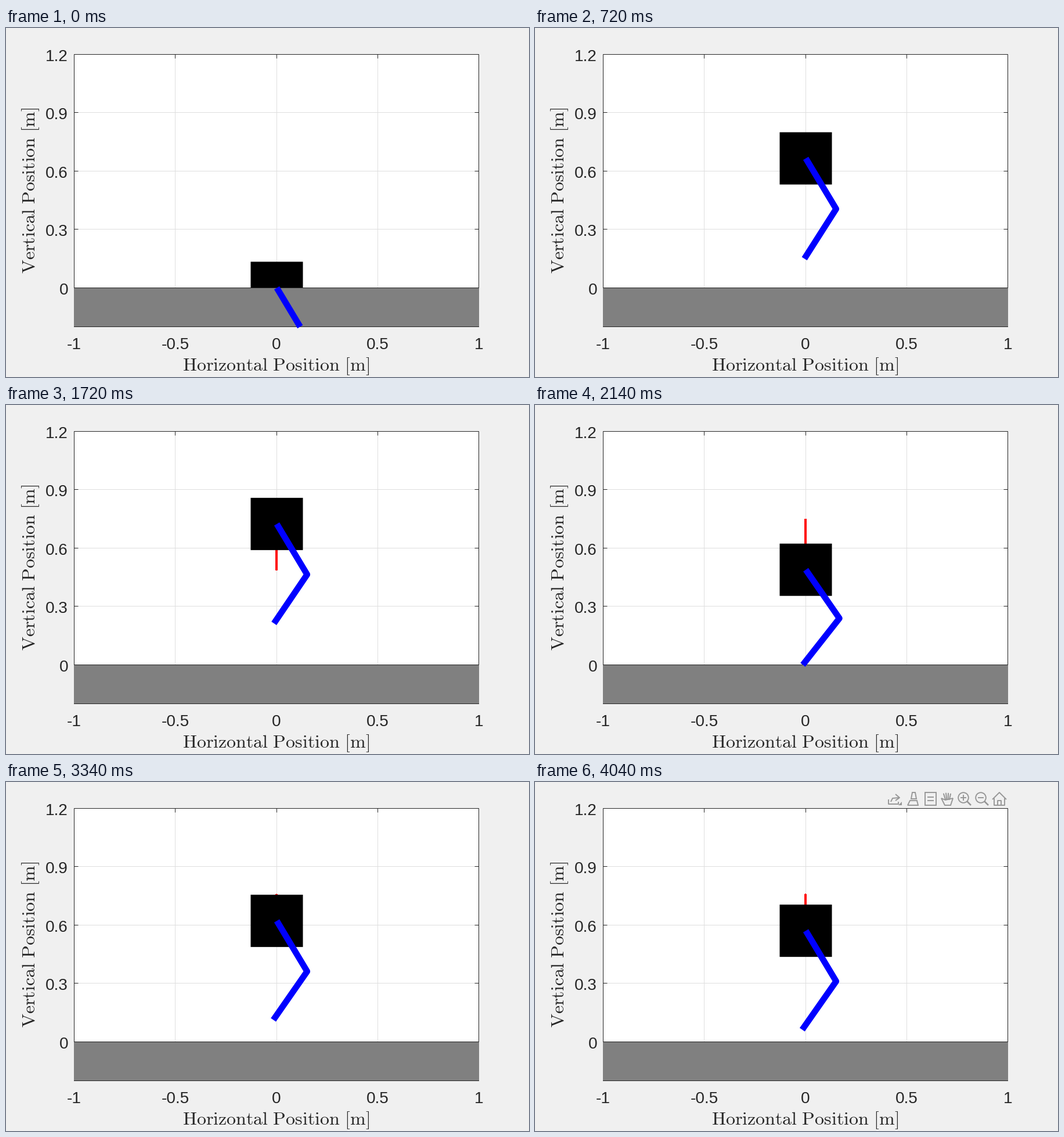
Write a matplotlib script that moves like this. It is 901x601 px and loops after 4060 ms.

```python
import math

import matplotlib.pyplot as plt
from matplotlib.animation import FuncAnimation
from matplotlib.patches import Circle, Polygon, Rectangle

W, H, DPI = 901, 601, 72          # at 72 dpi one point is one pixel
FRAMES, STEP = 203, 20
INK, ICON = "#262626", "#969696"

plt.rcParams.update({
    "font.family": "Liberation Sans",
    "mathtext.fontset": "cm",
    "path.simplify": False,
    "path.snap": False,
})

# Hopper: ballistic arcs joined by short stances, settling over the hops
LINK = 0.3
GRAVITY = 5.518
DROP = 0.672
DIP = 0.0215
TRAIL = 16


class Hop:
    """One arc through the air, with its leg pose and apex."""

    def __init__(self, i, lift):
        shank = math.radians(30 + 4.3 * (1 - math.exp(-i / 2.3)))
        self.foot = LINK * (0.5 - math.sin(shank))
        self.reach = LINK * (math.cos(math.pi / 6) + math.cos(shank))
        self.top = 0.756 - 0.041 * 0.5 ** i if i else DROP
        half = math.sqrt(2 * (self.top - self.reach) / GRAVITY)
        self.lift = lift
        self.apex = lift + half if i else 0
        self.touch = self.apex + half

    def height(self, t):
        return self.top - GRAVITY * (t - self.apex) ** 2 / 2


hops = []
lift = 0
while lift < FRAMES * STEP / 1000:
    i = len(hops)
    hops.append(Hop(i, lift))
    lift = hops[-1].touch + 0.0435 + 0.004 * i


def state(t):
    """Hip height, foot x and foot y at time t."""
    i = max(k for k, hop in enumerate(hops) if hop.lift <= t)
    a = hops[i]
    if t <= a.touch:
        y = a.height(t)
        return y, a.foot, y - a.reach
    b = hops[i + 1]
    u = (t - a.touch) / (b.lift - a.touch)
    y = a.reach + (b.reach - a.reach) * u - DIP * math.sin(math.pi * u)
    return y, a.foot + (b.foot - a.foot) * u, 0


def knee_pos(hip, fx, fy):
    dx, dy = fx, fy - hip
    d = math.hypot(dx, dy)
    k = math.sqrt(LINK ** 2 - d * d / 4) / d
    return dx / 2 - dy * k, hip + dy / 2 + dx * k


def px(x):
    return 466.5 + 348.5 * x


def py(y):
    return 447.5 - 335 * y


fig = plt.figure(figsize=((W + 1e-6) / DPI, (H + 1e-6) / DPI), dpi=DPI,
                 facecolor="#f0f0f0")
ax = fig.add_axes([0, 0, 1, 1])
ax.set_xlim(0, W)
ax.set_ylim(H, 0)
ax.axis("off")


def line(xs, ys, color=INK, lw=1.0, z=2, cap="butt"):
    return ax.plot(xs, ys, color=color, lw=lw, zorder=z,
                   solid_capstyle=cap, solid_joinstyle="round")[0]


def box(x, y, w, h, color, z):
    return ax.add_patch(Rectangle((x, y), w, h, fc=color, lw=0, zorder=z))


def label(x, y, s, size=28, ha="center", **kw):
    ax.text(x, y, s, size=size, color=INK, ha=ha, va="baseline", **kw)


# Plot area, grid, ticks and labels
LEFT, RIGHT, TOP, BOTTOM = 117.5, 814.5, 45.5, 514.5
box(LEFT, TOP, RIGHT - LEFT, BOTTOM - TOP, "white", 0)
for k in range(5):
    x, y = 117.3 + 174.4 * k, 45.2 + 100.6 * k
    label(x, 553.3, f"{-1 + k / 2:g}")
    label(107, y + 11.3, f"{1.2 - 0.3 * k:.1f}" if k < 4 else "0", ha="right")
    if 0 < k < 4:
        c, r = int(x) + 0.5, int(y) + 0.5
        line([c, c], [TOP, BOTTOM], "#dedede", z=1)
        line([LEFT, RIGHT], [r, r], "#dedede", z=1)
        line([c, c], [TOP, TOP + 7])
        line([LEFT, LEFT + 7], [r, r])
        line([RIGHT - 7, RIGHT], [r, r])
ax.add_patch(Rectangle((LEFT, TOP), RIGHT - LEFT, BOTTOM - TOP, fill=False,
                       ec=INK, lw=1, zorder=2))
label(464.7, 590.4, r"$\mathrm{Horizontal\ Position\ [m]}$", 32)
label(50, 280, r"$\mathrm{Vertical\ Position\ [m]}$", 32, rotation=90,
      rotation_mode="anchor")

# Moving parts and the ground
trail = line([], [], "red", 4, z=3)
body = box(px(0) - 45, 0, 90, 90, "black", 4)
box(117, 447, 698, 68, "#808080", 5)
for r in (447.5, BOTTOM):
    line([117, 815], [r, r], z=6)
leg = line([], [], "blue", 10.67, z=7)


def toolbar():
    """Small row of axes buttons above the plot."""
    parts = []

    def add(patch):
        parts.append(ax.add_patch(patch))

    def stroke(*pts, lw=1.9, cap="butt"):
        parts.append(line(*zip(*pts), ICON, lw, z=8, cap=cap))

    def outline(*pts):
        add(Polygon(pts, fill=False, ec=ICON, lw=1.9, zorder=8))

    # export: tray, arrow and menu corner
    stroke((609, 30), (609, 38), (626, 38), (626, 34))
    stroke((613, 34), (616, 28), (627, 27))
    stroke((621, 21), (628, 27), (621, 32))
    add(Polygon([(632, 34), (632, 40), (626, 40)], fc=ICON, lw=0, zorder=8))
    # brush
    outline((650, 18), (655, 18), (657, 29), (648, 29))
    outline((646, 32), (658, 32), (660, 40), (642, 40))
    # data tips
    outline((672, 18), (691, 18), (691, 40), (672, 40))
    for y in (26, 32):
        stroke((676, y), (687, y))
    # hand: fan of fingers over a palm
    for k in range(4):
        x = 704 + 4 * k
        stroke((707 + 2.3 * k, 30), (x, 19 + abs(k - 1.4)), lw=2, cap="round")
    outline((700, 28), (707, 31), (720, 28), (716, 40), (706, 40))
    # zoom in and out
    for x in (738, 768):
        add(Circle((x, 27), 8.8, fill=False, ec=ICON, lw=1.9, zorder=8))
        stroke((x + 6, 33), (x + 13, 40), lw=2.6)
        stroke((x - 5, 27), (x + 5, 27))
    stroke((738, 22), (738, 32))
    # home
    stroke((788, 30), (800, 18), (812, 30))
    stroke((791, 28), (791, 40), (809, 40), (809, 28))
    stroke((797, 40), (797, 32), (803, 32), (803, 40))
    return parts


buttons = toolbar()


def update(n):
    if n == 0:
        # rest pose, thigh cut at the lower axis limit
        hip = 0
        joints = [(0, 0), (0.2 * math.tan(math.pi / 6), -0.2)]
    else:
        hip, fx, fy = state(n * STEP / 1000)
        joints = [(0, hip), knee_pos(hip, fx, fy), (fx, fy)]
    leg.set_data([px(x) for x, _ in joints], [py(y) for _, y in joints])
    body.set_y(py(hip) - 45)
    past = [py(state(k * STEP / 1000)[0])
            for k in range(max(1, n - TRAIL), n + 1)]
    trail.set_data([466] * len(past), past)
    for b in buttons:
        b.set_visible(n == FRAMES - 1)
    return [trail, body, leg, *buttons]


anim = FuncAnimation(fig, update, frames=FRAMES, interval=STEP, repeat=True,
                     repeat_delay=0, blit=False)
plt.show()
```
